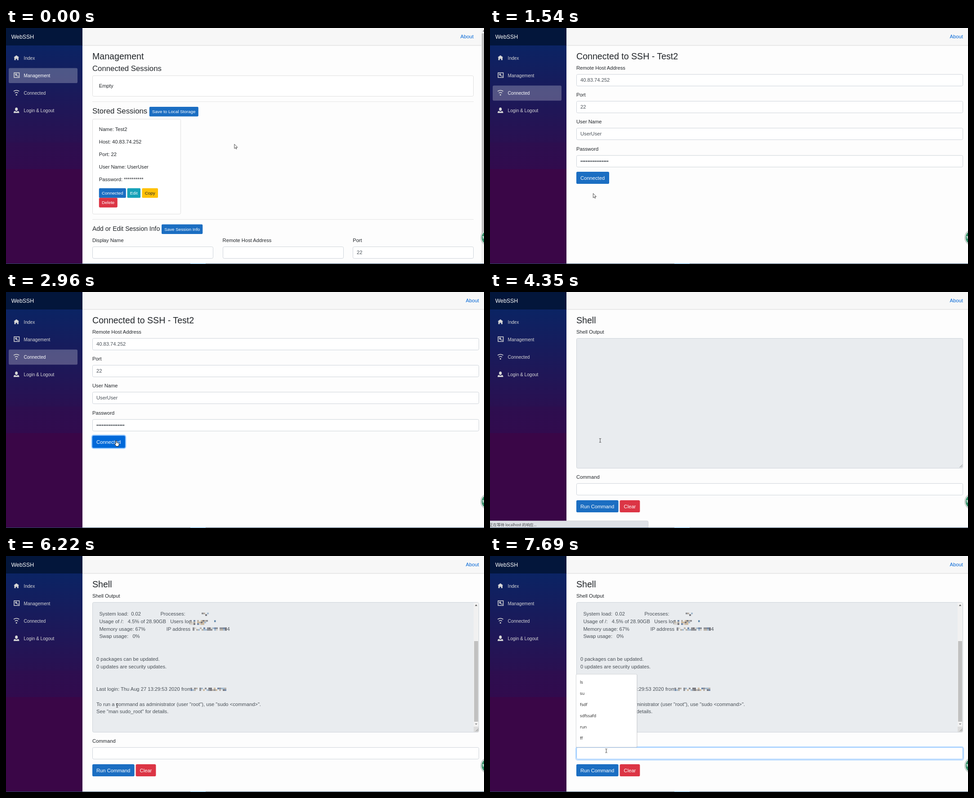
Recreate the animation shown at these times as an HTML page. Size 1063 by 527 pixels, loop 8000 ms.

```html
<!DOCTYPE html>
<html lang="en">
<head>
<meta charset="utf-8">
<title>WebSSH</title>
<style>
html, body { margin: 0; width: 100%; height: 100%; overflow: hidden; background: #fdfdfd; }
svg { display: block; width: 100%; height: 100%; }
text { font-family: "Liberation Sans", Arial, sans-serif; white-space: pre; }
.list text { font-family: "Open Sans", sans-serif; }
.status text { font-family: "Noto Sans CJK SC", "Noto Sans CJK", sans-serif; }
</style>
</head>
<body>
<svg id="stage" viewBox="0 0 1063 527" xmlns="http://www.w3.org/2000/svg"></svg>
<script>
const LOOP = 8000;
const INK = '#212529', FIELD = '#495057', BLUE = '#1b6ec2', HOVER = '#0069d9', PRESSED = '#005cbf';
const RED = '#dc3545', TEAL = '#17a2b8', AMBER = '#ffc107';

const esc = s => s.replace(/&/g, '&amp;').replace(/</g, '&lt;');
const text = (x, y, s, size = 11.2, fill = INK, extra = '') =>
  `<text x="${x}" y="${y}" font-size="${size}" fill="${fill}" ${extra}>${esc(s)}</text>`;
const rect = (x, y, w, h, fill, extra = '') =>
  `<rect x="${x}" y="${y}" width="${w}" height="${h}" fill="${fill}" ${extra}/>`;
const box = (x, y, w, h, line, fill = '#fff', id = '') =>
  rect(x + .5, y + .5, w - 1, h - 1, fill, `rx="2.8" stroke="${line}" ${id && `id="${id}"`}`);
const group = (id, body, extra = '') => `<g id="${id}" ${extra}>${body}</g>`;
const input = (x, y, w, value = '', id = '') =>
  box(x, y, w, 27, '#ced4da', '#fff', id) + text(x + 9, y + 17.2, value, 11.2, FIELD);
const button = (x, y, w, label, fill, small, id = '', ink = '#fff') =>
  rect(x, y, w, small ? 21.5 : 27, fill, `rx="${small ? 2.1 : 2.8}" ${id && `id="${id}"`}`) +
  text(x + (small ? 6.2 : 9), y + (small ? 14.2 : 17.5), label, small ? 9.8 : 11.2, ink);
const rule = y => rect(192, y, 848, 1, '#e5e5e5');

// Sidebar
const icons = [
  '<path transform="translate(17 61) scale(1.54)" d="M4 0L0 3h1v4h2V5h2v2h2V3h1z"/>',
  '<g fill="none" stroke="#d7d7d7" stroke-width="1.5"><path d="M18 100h11.5v10.5H18z"/><circle cx="22.4" cy="104" r="1.5"/><path d="M23.4 105.2l1.6 2.2M25.6 107.6h2.4"/></g>',
  '<g fill="none" stroke="#d7d7d7" stroke-width="1.5"><path d="M17 141.4Q23.2 137 29.4 141.4M19.6 145.4Q23.2 142.8 26.8 145.4"/></g><circle cx="23.2" cy="149.2" r="1.5"/>',
  '<path transform="translate(17 177.5) scale(1.54)" d="M4 0C2.9 0 2 1.1 2 2.5S2.9 5 4 5s2-1.1 2-2.5S5.100 0 4 0zM1.900 5C.85 5 0 5.900 0 7v1h8V7c0-1.100-.85-2-1.900-2-.54.600-1.300 1-2.100 1s-1.560-.4-2.100-1z"/>'
];
const labels = ['Index', 'Management', 'Connected', 'Login & Logout'];
const sidebar =
  `<defs><linearGradient id="night" gradientUnits="userSpaceOnUse" x1="0" y1="0" x2="0" y2="527">
    <stop offset="0" stop-color="#052767"/><stop offset=".486" stop-color="#2a1051"/>
    <stop offset=".486" stop-color="#2d0e4f"/><stop offset=".598" stop-color="#310b4e"/>
    <stop offset=".598" stop-color="#3a0647"/></linearGradient></defs>` +
  rect(0, 0, 170, 527, 'url(#night)') + rect(0, 0, 170, 39, '#03163b') +
  text(11.7, 23.8, 'WebSSH', 12.32, '#fff') +
  rect(6, 89.4, 153, 33.6, '#fff', 'id="active" rx="2.8" fill-opacity=".25"') +
  group('icons', icons.join(''), 'fill="#d7d7d7"') +
  labels.map((s, i) => text(39.6, 70.6 + i * 39.15, s, 10.08, '#d7d7d7', 'class="nav"')).join('');

const topbar = rect(170, 0, 893, 38.5, '#f7f7f7') + rect(170, 38.4, 893, 1, '#d6d5d5') +
  text(1022.6, 23, 'About', 11.2, '#0366d6', 'id="about"');

// Pages
const manage =
  text(192, 70, 'Management', 19.6) + text(192, 96.2, 'Connected Sessions', 16.8) +
  box(192, 106, 848, 47, '#dfdfdf') + text(206.8, 133, 'Empty') + rule(164) +
  text(192, 191.4, 'Stored Sessions', 16.8) + button(318.8, 176, 109, 'Save to Local Storage', BLUE, true) +
  box(192, 203, 197, 213, '#dfdfdf') +
  ['Name: Test2', 'Host: 40.83.74.252', 'Port: 22', 'User Name: UserUser', 'Password: **********']
    .map((s, i) => text(206.8, 230 + i * 28, s)).join('') +
  button(206.8, 357.8, 60, 'Connected', BLUE, true, 'open') +
  button(269.6, 357.8, 29.5, 'Edit', TEAL, true) +
  button(302.5, 357.8, 35.5, 'Copy', AMBER, true, '', INK) +
  button(206.8, 379.2, 41, 'Delete', RED, true) + rule(427) +
  text(192, 453.2, 'Add or Edit Session Info', 14) + button(346, 438.6, 91.3, 'Save Session Info', BLUE, true) +
  [['Display Name', ''], ['Remote Host Address', ''], ['Port', '22']].map(([s, v], i) =>
    text(192 + i * 289.6, 477.8, s) + input(192 + Math.round(i * 289.5), 488, 269, v)).join('') +
  rect(1057, 0, 6, 527, '#f1f1f1') + rect(1058, 12, 5, 446, '#c1c1c1') +
  '<path d="M1060 8l3-4v4z" fill="#666"/>';

const connect =
  text(192, 70, 'Connected to SSH - Test2', 19.6) +
  [['Remote Host Address', '40.83.74.252'], ['Port', '22'], ['User Name', 'UserUser'], ['Password', '•'.repeat(16)]]
    .map(([s, v], i) => text(192, 93 + i * 60.2, s) + input(192, 103 + Math.round(i * 60.2), 860, v)).join('') +
  rect(190.9, 319.9, 75.2, 29.2, 'none', 'id="goRing" rx="4" stroke="#268fff" stroke-opacity=".5" stroke-width="2.2"') +
  button(192, 321, 73, 'Connected', BLUE, false, 'go');

// Blurred patches: blocks of random muted colour
function mosaic(x, y, cols, rows, seed, fill = .7) {
  const tones = ['#8d8e93', '#b9b1a7', '#cbb89e', '#6f86a6', '#a4bace', '#d6d3ce', '#75757b'];
  const next = () => (seed = seed * 16807 % 2147483647) / 2147483647;
  let out = '';
  for (let r = 0; r < rows; r++)
    for (let c = 0; c < cols; c++) {
      const tone = tones[Math.floor(next() * tones.length)];
      if (next() < fill) out += rect(x + c * 4, y + r * 3.6, 4, 3.6, tone);
    }
  return out;
}
const lines = [
  [0, 207.4, 'System load:  0.02'], [0, 343.4, 'Processes:'],
  [1, 207.4, 'Usage of /:   4.5% of 28.90GB'], [1, 365.2, 'Users log'],
  [2, 207.4, 'Memory usage: 67%'], [2, 356.8, 'IP address'], [2, 491.5, '4'],
  [3, 207.4, 'Swap usage:   0%'],
  [6, 201, '0 packages can be updated.'], [7, 201, '0 updates are security updates.'],
  [10, 201, 'Last login: Thu Aug 27 13:29:53 2020 from'],
  [12, 201, 'To run a command as administrator (user "root"), use "sudo <command>".'],
  [13, 201, 'See "man sudo_root" for details.']
];
const output =
  lines.map(([row, x, s]) => text(x, 133 + row * 16.8, s, 11.2, FIELD)).join('') +
  mosaic(435, 126.5, 4, 2, 77) + mosaic(409, 143, 10, 3, 1234) + rect(463, 143.5, 3.5, 4, '#5f86a8') +
  mosaic(415, 159.5, 19, 2, 991) + mosaic(410, 294, 20, 2, 4321) +
  rect(1040, 104, 11, 277, '#f1f1f1') + rect(1041, 190, 9, 180, '#c1c1c1') +
  rect(1040, 381, 11, 12, '#dcdcdc') +
  '<path d="M1042.800 111.500h5.400l-2.700-3.200z" fill="#505050"/><path d="M1042.800 374h5.400l-2.700 3z" fill="#8a8a8a"/>';

const shell =
  text(192, 70, 'Shell', 19.6) + text(192, 93, 'Shell Output') +
  box(192, 103, 860, 291, '#ced4da', '#e9ecef') + group('output', output) +
  '<path d="M1044.500 391.500l6-6M1047.500 391.500l3-3" stroke="#777" stroke-width=".9"/>' +
  text(192, 417.2, 'Command') +
  group('ring', rect(190.9, 426.4, 862.2, 29.2, 'none', 'rx="4" stroke="#007bff" stroke-opacity=".25" stroke-width="2.2"')) +
  input(192, 427, 860, '', 'cmd') + rect(201, 434, 1, 13, '#333', 'id="caret"') +
  button(192, 465, 93.6, 'Run Command', BLUE) + button(288.6, 465, 44.8, 'Clear', RED);

const list = rect(190.8, 263.8, 137, 164.8, '#000', 'rx="3" fill-opacity=".09"') +
  rect(191.5, 264, 135.300, 163, '#fff', 'rx="2" stroke="#c9ccd0" stroke-width=".7"') +
  ['ls', 'su', 'fsdf', 'sdfssafd', 'run', 'ff'].map((s, i) => text(200, 284.7 + i * 25.1, s, 9.3, '#222')).join('');

const status = '<path d="M0 511h349q3 0 3 3v13H0z" fill="#dee1e6" stroke="#c4c7cc" stroke-width=".6"/>' +
  text(-1.5, 522.6, '正在等待 localhost 的响应...', 8.4, '#44474b');

const edge = rect(0, 526, 1063, 1, '#2c4a66') + rect(410, 526, 34, 1, '#4c9bd6') +
  '<circle cx="1073.500" cy="468" r="18.500" fill="#b9bfbc"/><circle cx="1073.500" cy="468" r="17.300" fill="#e6ece9"/>' +
  '<circle cx="1073.500" cy="468" r="15.800" fill="#38906a"/>' + text(1059, 469.500, '5', 8, '#fff', 'font-weight="bold"');

const cursors =
  group('arrow', '<path d="M.4.4v9.800l2.300-2.100 1.500 3.200 1.500-.7-1.500-3.100h3.100z" fill="#fff" stroke="#222" stroke-width=".8"/>') +
  group('hand', '<path d="M-1 .8q1-1.300 2 0v4l4.300 1q1.300.4 1.200 1.800l-.8 3.200-.8 2.200h-4.700l-3.600-4.800q.2-1.500 1.600-.7l.8.7z" fill="#fff" stroke="#111" stroke-width=".9"/>') +
  group('beam', '<path d="M-2.200-4.200h1.600l.6.500.6-.5h1.600M-2.200 4.200h1.600l.6-.5.6.5h1.600M0-3.800v7.600" fill="none" stroke="#333" stroke-width=".9"/>');

const stage = document.getElementById('stage');
stage.innerHTML = rect(0, 0, 1063, 527, '#fdfdfd') + topbar + sidebar +
  group('manage', manage) + group('connect', connect) + group('shell', shell) +
  group('list', list, 'class="list"') + group('status', status, 'class="status"') +
  edge + group('cursor', cursors);

const $ = id => document.getElementById(id);
const show = (id, on) => { $(id).style.display = on ? '' : 'none'; };
const navs = [...document.querySelectorAll('.nav')];

// Stepped progress: n changes, dt apart, the first at t0
const steps = (t, t0, n, dt) => t < t0 ? 0 : Math.min(1, (Math.floor((t - t0) / dt) + 1) / n);
const ease = p => p * p * (3 - 2 * p);

// [start, changes, spacing, to x, to y, sideways bow]
const moves = [
  [150, 11, 77, 229, 369, 0],
  [2090, 5, 80, 245, 331.5, 0],
  [6220, 3, 75, 253, 340, 0],
  [6600, 5, 77.5, 259, 435, 9],
  [7140, 1, 80, 258.5, 435, 0]
];
function pointer(t) {
  let x = 507.5, y = 259;
  for (const [t0, n, dt, tx, ty, bow] of moves) {
    const p = ease(steps(t, t0, n, dt));
    x += (tx - x) * p + bow * Math.sin(Math.PI * p);
    y += (ty - y) * p;
  }
  return [x, y];
}

function draw(t) {
  const page = t < 1450 ? 'manage' : t < 4350 ? 'connect' : 'shell';
  ['manage', 'connect', 'shell'].forEach(id => show(id, id === page));
  const current = { manage: 1, connect: 2 }[page];
  show('active', current);
  if (current) $('active').setAttribute('y', 50.3 + current * 39.15);
  navs.forEach((n, i) => n.setAttribute('fill', i === current ? '#fff' : '#d7d7d7'));
  $('about').setAttribute('x', page === 'manage' ? 1010.6 : 1022.6);

  const [x, y] = pointer(t);
  const onOpen = page === 'manage' && x < 267 && y > 358;
  const onGo = page === 'connect' && y < 348;
  const onField = page === 'shell' && (y < 394 || y > 427);
  $('open').setAttribute('fill', onOpen ? HOVER : BLUE);
  $('go').setAttribute('fill', t >= 2640 && t < 2880 ? PRESSED : onGo ? HOVER : BLUE);
  $('goRing').setAttribute('opacity', steps(t, 2640, 3, 80));

  show('output', t >= 6220);
  $('status').setAttribute('opacity', t < 4350 ? 0 : 1 - steps(t, 4660, 4, 76));
  const focus = steps(t, 7140, 3, 80);
  $('ring').setAttribute('opacity', focus);
  $('cmd').setAttribute('stroke', focus ? '#80bdff' : '#ced4da');
  $('list').setAttribute('opacity', focus);
  show('caret', t >= 7140 && t < 7690);

  show('hand', onOpen || onGo);
  show('beam', onField);
  show('arrow', !onOpen && !onGo && !onField);
  $('cursor').setAttribute('transform', `translate(${x} ${y})`);
}

const start = performance.now();
function tick(now) {
  draw(Math.max(0, now - start) % LOOP);
  requestAnimationFrame(tick);
}
draw(0);
requestAnimationFrame(tick);
</script>
</body>
</html>
```
